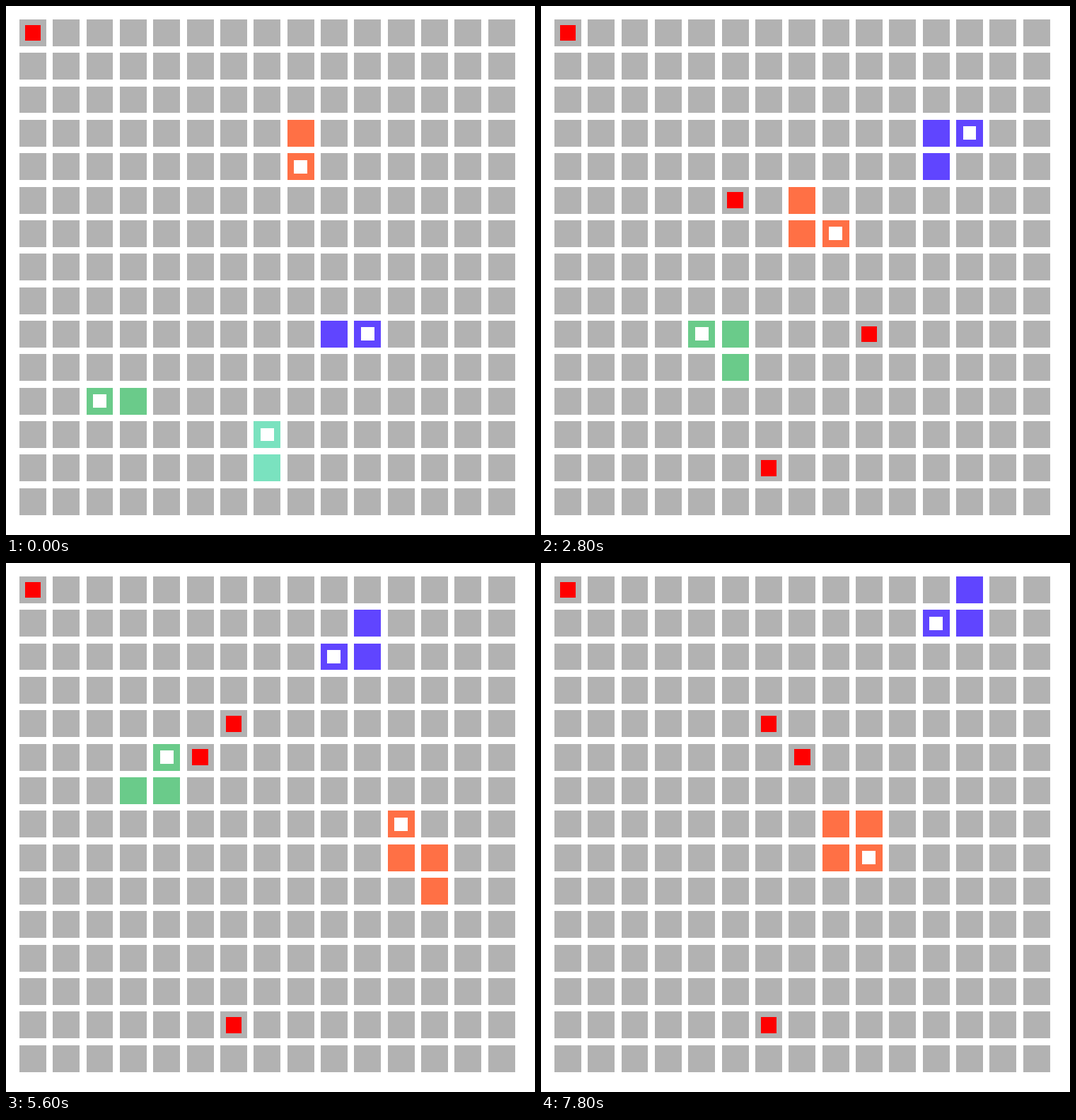
Write an HTML page with a canvas that moves like this. It is 748 px wide and 748 px high and loops after 8 s.

```html
<!DOCTYPE html>
<html lang="en">
<head>
<meta charset="utf-8">
<title>Snakes on a grid</title>
<style>
  html, body { margin: 0; width: 100%; height: 100%; overflow: hidden; background: #fff; }
  canvas { display: block; width: 748px; height: 748px; }
</style>
</head>
<body>
<canvas id="stage" width="748" height="748"></canvas>
<script>
const ctx = document.getElementById('stage').getContext('2d');
const SIZE = 748, CELLS = 15, STEP_MS = 200, STEPS = 40;
const PITCH = SIZE / (CELLS + 0.8), CELL = PITCH * 0.8;
const DIRECTIONS = { U: [0, -1], D: [0, 1], L: [-1, 0], R: [1, 0] };

// Each snake starts at its tail cell; one move per step, gone when the moves run out.
const snakes = [
  { color: '#ff7045', start: [8, 3], grows: 20, moves: 'D LLDRDLUR DLUR DR RDDL DRD RRR UULUL ULU RDLD LDR' },
  { color: '#6045ff', start: [9, 9], moves: 'R URUURU UR DLLU UR DRUL DLUL LU URDLUR RD RULURDL' },
  { color: '#6acb8a', start: [3, 11], grows: 29, moves: 'L URDDRU UR DLUR UL DRUL LLLURU RURUR' },
  { color: '#7ae2bf', start: [7, 13], moves: 'U URD' }
].map(snake => ({ ...snake, path: tracePath(snake.start, snake.moves) }));

// Food is visible from step `from` up to, not including, step `to`.
const foods = [
  { cell: [0, 0], from: 0, to: STEPS },
  { cell: [9, 9], from: 4, to: 20 },
  { cell: [6, 13], from: 4, to: STEPS },
  { cell: [5, 5], from: 11, to: 29 },
  { cell: [6, 4], from: 20, to: STEPS },
  { cell: [7, 5], from: 38, to: STEPS }
];

function tracePath(start, moves) {
  const path = [start];
  for (const move of moves.replaceAll(' ', '')) {
    const [x, y] = path[path.length - 1], [dx, dy] = DIRECTIONS[move];
    path.push([x + dx, y + dy]);
  }
  return path;
}

function drawSquare([col, row], color, scale = 1) {
  const inset = CELL * (1 - scale) / 2;
  const edge = i => PITCH * (i + 0.4) + inset;
  const x = Math.round(edge(col)), y = Math.round(edge(row));
  ctx.fillStyle = color;
  ctx.fillRect(x, y,
    Math.round(edge(col) + CELL * scale) - x,
    Math.round(edge(row) + CELL * scale) - y);
}

function drawSnake({ color, path, grows = Infinity }, step) {
  const head = step + 1;
  if (head >= path.length) return;
  const length = step >= grows ? 4 : 3;
  path.slice(Math.max(0, head - length + 1), head + 1).forEach(cell => drawSquare(cell, color));
  drawSquare(path[head], '#fff', 0.5);
}

function draw(step) {
  ctx.fillStyle = '#fff';
  ctx.fillRect(0, 0, SIZE, SIZE);
  for (let row = 0; row < CELLS; row++)
    for (let col = 0; col < CELLS; col++) drawSquare([col, row], '#b2b2b2');
  for (const { cell, from, to } of foods)
    if (step >= from && step < to) drawSquare(cell, '#f00', 0.6);
  for (const snake of snakes) drawSnake(snake, step);
}

function tick() {
  draw(Math.floor(performance.now() / STEP_MS) % STEPS);
  requestAnimationFrame(tick);
}
tick();
</script>
</body>
</html>
```
